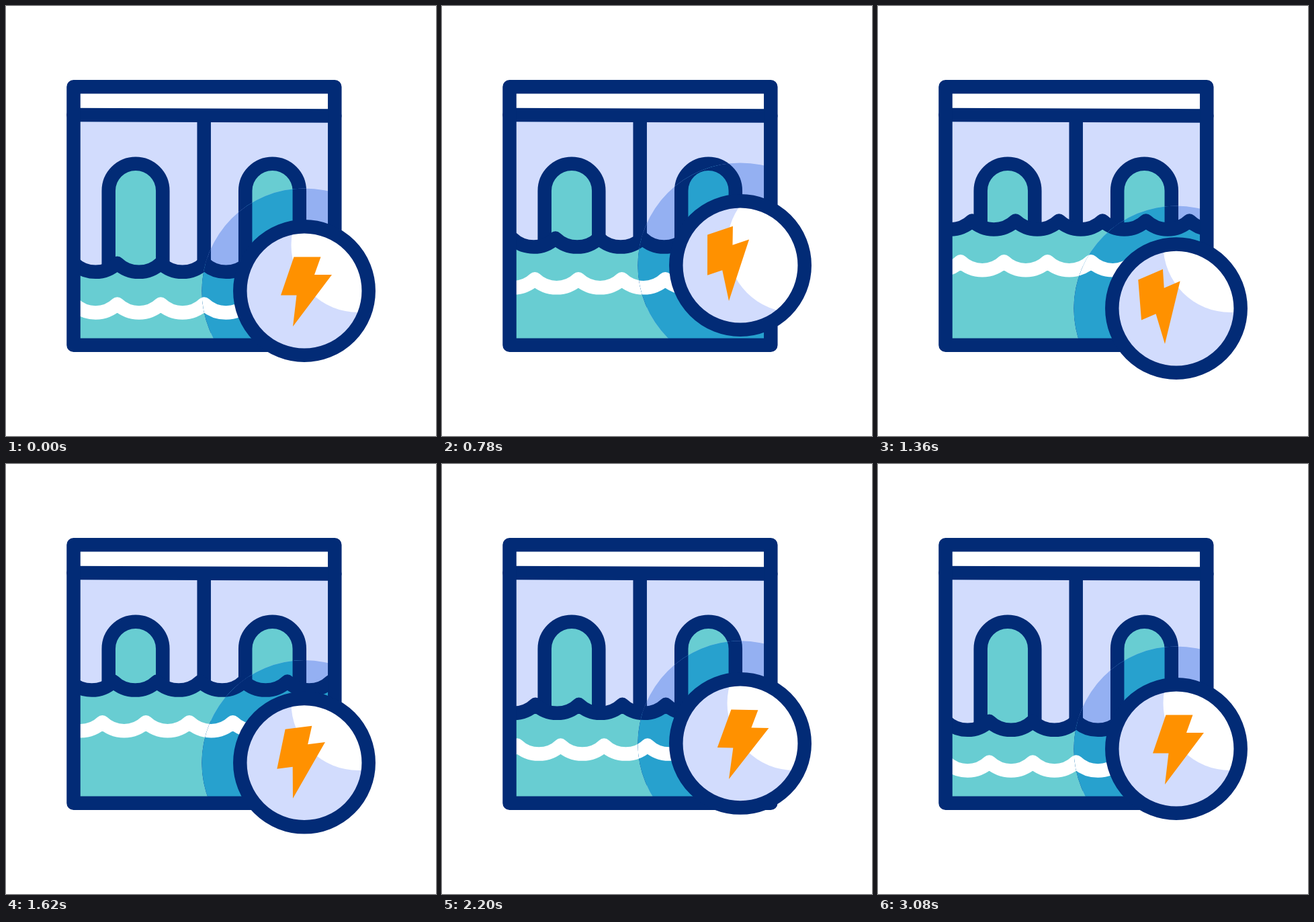
An HTML page with a canvas that plays this animation: 640 px wide and 640 px high, repeating every 3600 ms.

```html
<!DOCTYPE html>
<html lang="en">
<head>
<meta charset="utf-8">
<title>Hydro power</title>
<style>
html, body { margin: 0; width: 100%; height: 100%; overflow: hidden; background: #fff; }
canvas { display: block; width: 640px; height: 640px; }
</style>
</head>
<body>
<canvas id="stage"></canvas>
<script>
const LOOP = 3600, LINE = 20.5, PERIOD = 64.7, TRAVEL = 2800;
const NAVY = '#022b76', ORANGE = '#ff9100', LIGHT = '#d2dcfd';
const TEAL = '#68cdd2', LIGHT_SHADE = '#94b0f2', TEAL_SHADE = '#27a1ce';

// [time in ms, value] pairs
const BADGE_Y = [[0, 424], [780, 386], [1460, 454], [2036, 405], [2470, 438.7], [2800, 424]];
const BOLT_TILT = [[280, 0], [1140, -30.2], [1900, 3], [2400, 0]];
const WATER_RISE = [[0, 0], [1400, 63.5], [2800, 0]];
const BOLT = [[1.5, -103.5], [41.5, -103.5], [32, -77], [58, -77], [0, 0], [5.5, -46.5], [-18, -46.5]];

const stage = document.getElementById('stage');
const ctx = stage.getContext('2d');
const ratio = window.devicePixelRatio || 1;
stage.width = stage.height = 640 * ratio;

function ease(u) {
  u = Math.min(1, Math.max(0, u));
  return u * u * (3 - 2 * u);
}

function track(keys, t) {
  let value = keys[0][1];
  for (let i = 1; i < keys.length; i++) {
    const [t0, v0] = keys[i - 1], [t1, v1] = keys[i];
    if (t >= t0) value = v0 + (v1 - v0) * ease((t - t0) / (t1 - t0));
  }
  return value;
}

function stroke(color) {
  ctx.strokeStyle = color;
  ctx.stroke();
}

function fill(color) {
  ctx.fillStyle = color;
  ctx.fill();
}

function line(x0, y0, x1, y1) {
  ctx.beginPath();
  ctx.moveTo(x0, y0);
  ctx.lineTo(x1, y1);
  stroke(NAVY);
}

function disc(x, y, r) {
  ctx.beginPath();
  ctx.arc(x, y, r, 0, 2 * Math.PI);
}

function arch(x, teal) {
  ctx.beginPath();
  ctx.moveTo(x - 40.3, 490);
  ctx.arc(x, 275, 40.3, Math.PI, 0);
  ctx.lineTo(x + 40.3, 490);
  fill(teal);
  stroke(NAVY);
}

// A chain of hanging arcs that meet in crests; y is the level of the troughs.
function wave(crest, y) {
  const r = 46.7, half = Math.asin(PERIOD / 2 / r);
  const start = crest - PERIOD * Math.ceil((crest - 20) / PERIOD);
  ctx.beginPath();
  for (let x = start; x < 560; x += PERIOD)
    ctx.arc(x + PERIOD / 2, y - r, r, Math.PI / 2 + half, Math.PI / 2 - half, true);
}

function dam(t, light, teal) {
  const rise = track(WATER_RISE, t);
  const crest = delay => 165.6 - 5 * PERIOD * ease((t - delay) / TRAVEL);

  ctx.fillStyle = light;
  ctx.fillRect(100, 163, 390, 342);
  arch(193, teal);
  arch(396.5, teal);
  line(294.7, 163, 294.7, 490);

  wave(crest(0), 395.8 - rise);
  ctx.lineTo(640, 505);
  ctx.lineTo(0, 505);
  fill(teal);
  wave(crest(0), 395.8 - rise);
  stroke(NAVY);
  wave(crest(280), 456.5 - rise);
  stroke('#fff');
}

function badge(t, y) {
  disc(444, y, 95.7);
  fill(LIGHT);
  ctx.save();
  ctx.clip();
  disc(524.5, 356, 100);
  fill('#fff');
  ctx.restore();
  disc(444, y, 95.7);
  stroke(NAVY);

  ctx.save();
  ctx.translate(427, y + 53);
  ctx.rotate(track(BOLT_TILT, t) * Math.PI / 180);
  ctx.beginPath();
  for (const [px, py] of BOLT) ctx.lineTo(px, py);
  fill(ORANGE);
  ctx.restore();
}

function draw(t) {
  const y = track(BADGE_Y, t);
  ctx.setTransform(ratio, 0, 0, ratio, 0, 0);
  ctx.fillStyle = '#fff';
  ctx.fillRect(0, 0, 640, 640);
  ctx.lineWidth = LINE;
  ctx.lineJoin = ctx.lineCap = 'round';

  ctx.save();
  ctx.beginPath();
  ctx.rect(100, 163, 390, 342);
  ctx.clip();
  dam(t, LIGHT, TEAL);
  disc(444, y, 152.6);
  ctx.clip();
  dam(t, LIGHT_SHADE, TEAL_SHADE);
  ctx.restore();

  line(100.5, 162, 489.3, 163.6);
  ctx.beginPath();
  ctx.rect(100.5, 120.3, 388.8, 384.4);
  stroke(NAVY);
  badge(t, y);
}

const begin = performance.now();
function tick() {
  draw((performance.now() - begin) % LOOP);
  requestAnimationFrame(tick);
}
tick();
</script>
</body>
</html>
```
